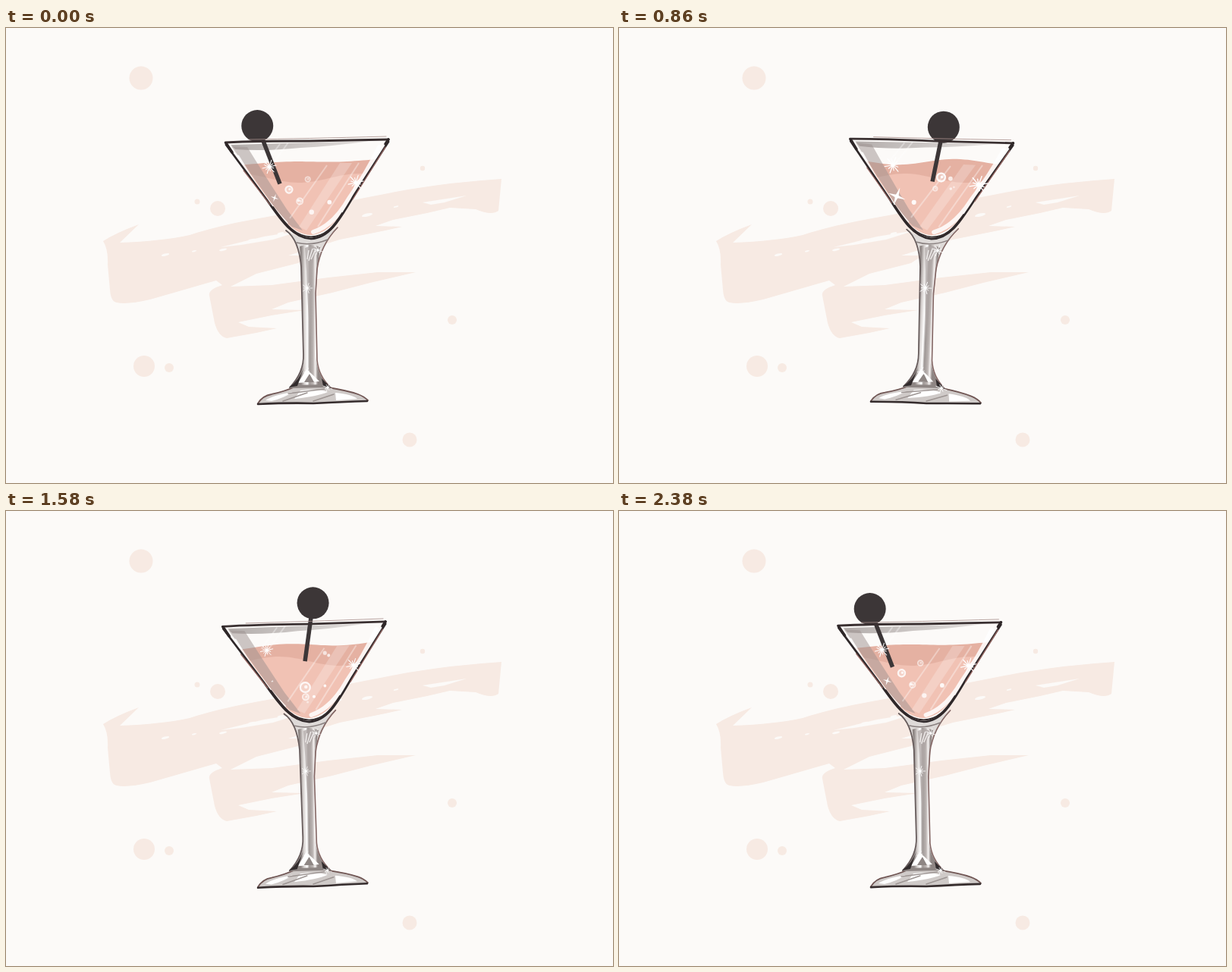
Recreate the animation shown at these times as an HTML page. Size 800 px wide and 600 px high, loop 2400 ms.

```html
<!DOCTYPE html>
<html lang="en">
<head>
<meta charset="utf-8">
<title>Cocktail</title>
<style>
  html, body { margin: 0; width: 100%; height: 100%; overflow: hidden; background: #fcfaf8; }
  svg { display: block; width: 100vw; height: 100vh; }
  .line { fill: none; stroke-linecap: round; stroke-linejoin: round; }
</style>
</head>
<body>
<svg viewBox="0 0 800 600" xmlns="http://www.w3.org/2000/svg">
  <defs>
    <clipPath id="bowl"><path id="bowlShape" d="M290 152 L503 148 L458 219 C439 250 427 270 402 273 C378 272 362 250 344 223 Z"/></clipPath>
    <linearGradient id="band">
      <stop offset="0" stop-color="#b3adab"/><stop offset="1" stop-color="#e4e0de"/>
    </linearGradient>
    <linearGradient id="stem" gradientUnits="userSpaceOnUse" x1="389" x2="411" y1="0" y2="0">
      <stop offset="0" stop-color="#8d8583"/><stop offset=".2" stop-color="#d9d4d2"/><stop offset=".38" stop-color="#fff"/>
      <stop offset=".5" stop-color="#9e9795"/><stop offset=".72" stop-color="#bcb5b3"/><stop offset=".85" stop-color="#f5f2f1"/><stop offset="1" stop-color="#8f8684"/>
    </linearGradient>
  </defs>

  <rect width="800" height="600" fill="#fcfaf8"/>
  <g id="dots" fill="#f7eae3">
    <path d="M653 199 Q590 203 530 213 C470 224 410 237 350 248 C310 255 275 262 242 273 Q205 281 150 283 L175 259 Q145 270 128 281 Q135 292 134 312 L137 345 Q138 361 146 362 Q160 365 190 358 L277 333 L285 339 Q266 345 268 353 L275 389 Q280 407 291 409 L330 402 L357 396 L320 394 L306 388 L350 379 L394 372 L350 371 L372 362 L430 349 L480 336 L540 322 L490 322 L425 329 L350 339 L296 341 L330 324 L385 310 L400 300 L372 300 L440 279 L500 267 L522 262 L487 261 L510 253 L555 244 L585 237 L619 239 Q640 248 649 241 Z"/>
  </g>
  <g id="flecks" fill="#fcfaf8">
    <path d="M283 289 L340 275 L390 267 L352 279 L310 286 Z M549 230 L607 221 L578 230 L560 233 Z"/>
  </g>

  <g class="tilt">
    <!-- foot -->
    <path d="M332 495 Q337 486 350 483 Q370 478 382 472 L420 472 Q450 478 466 484 L477 491 Q405 499 332 495 Z" fill="#cfcac8"/>
    <path d="M342 491 Q352 484 378 480 Q366 488 350 492 Z M388 478 Q410 475 424 480 Q410 486 380 489 Z M434 481 Q456 483 463 489 L435 491 Z" fill="#fff"/>
    <path d="M365 492 L397 481 M405 492 L432 483 M372 482 L420 476" stroke="#9d9593" stroke-width="1.5" class="line"/>
    <path d="M332 495 Q338 485 350 483 Q368 479 381 473 M424 474 Q450 478 464 483 Q472 486 477 491" class="line" stroke="#705654" stroke-width="1.8"/>
    <path d="M332 496 Q375 494 405 495 Q445 493 476 492" class="line" stroke="#352c2d" stroke-width="2.6"/>
    <!-- stem -->
    <path d="M369 266 Q402 290 437 262 Q418 286 413 308 L390 308 Q386 284 369 266 Z" fill="#dedad8"/>
    <path d="M387 288 Q401 283 414 289 Q407 330 408 430 Q409 456 426 473 L374 474 Q392 454 393 435 L390 330 Z" fill="url(#stem)"/>
    <path d="M394 290 Q402 286 411 290 Q404 302 402 325 L401 410 Q397 360 396 320 Z" fill="#b0a9a7" opacity=".75"/>
    <path d="M399 293 L397 305 M404 291 L399 307 M408 292 L402 305" stroke="#f2efee" stroke-width="1.3"/>
    <path d="M396 450 Q403 456 413 466 L385 468 Z" fill="#fff"/>
    <path d="M400 456 L406 467 L393 467 Z M379 471 L420 470 L426 474 L374 475 Z" fill="#8e8684"/>
    <path d="M369 267 Q386 279 389 315 L392 430 Q393 454 374 474" class="line" stroke="#665b5b" stroke-width="1.8"/>
    <path d="M437 263 Q414 287 410 318 L408 350 L410 438 Q412 459 428 474" class="line" stroke="#826563" stroke-width="1.6"/>
    <path d="M392 449 Q387 464 373 474 L384 472 Z M416 462 L429 475 L418 472 Z" fill="#312b2c"/>
    <path d="M383 283 Q402 288 424 279" class="line" stroke="#8a8180" stroke-width="1.5"/>
    <!-- bowl -->
    <path d="M288 151 L505 146 L459 219 C440 252 427 276 402 277 C378 276 362 252 344 226 Z" fill="#fcfaf8"/>
    <path d="M296 154 L480 149 Q430 156 388 158 Q340 163 302 160 Z" fill="url(#band)"/>
  </g>

  <g clip-path="url(#bowl)">
    <path id="back" fill="#e5b1a2"/>
    <path id="front" fill="#f1c2b4"/>
  </g>

  <g class="tilt">
    <path d="M297 156 L318 157 Q342 196 370 239 L391 267 L377 262 Q360 247 344 222 Z" fill="#9d9290" opacity=".5"/>
    <path d="M440 178 L456 178 L396 267 L386 262 Z" fill="#fff" opacity=".22"/>
    <path d="M423 181 L374 251 M465 178 L411 262 M372 151 L345 188 M361 153 L340 181" stroke="#fff" stroke-width="2" opacity=".35"/>
    <path d="M492 157 Q475 192 452 225 Q432 260 405 269" class="line" stroke="#fff" stroke-width="6" opacity=".85"/>
    <path d="M306 169 Q337 222 370 257" class="line" stroke="#fff" stroke-width="3" opacity=".8"/>
  </g>

  <path id="rod" stroke="#3c3637" stroke-width="5.5"/>
  <circle id="knob" r="21" fill="#3c3637"/>

  <g class="tilt">
    <path d="M290 154 L344 227 C362 253 378 277 402 278 C427 277 440 252 459 220 L504 150" class="line" stroke="#2f282a" stroke-width="2.7"/>
    <path d="M352 236 C370 261 382 275 402 275.5 C420 275 430 264 443 244" class="line" stroke="#302829" stroke-width="1.8"/>
    <path d="M313 188 L348 233 M457 226 L500 157" class="line" stroke="#9a6964" stroke-width="1.2"/>
    <path d="M289 151 Q330 149 400 149 Q460 148 504 147" class="line" stroke="#3a3031" stroke-width="2.8"/>
    <path d="M290 152 L298 164 M504 147 L500 153" class="line" stroke="#2e2728" stroke-width="3.6"/>
    <path d="M320 147 Q390 146 501 143" class="line" stroke="#a88e8b" stroke-width=".8"/>
    <g id="bubbles"></g>
    <g id="stars" stroke="#fff" stroke-linecap="round"></g>
  </g>
</svg>
<script>
const LOOP = 2400, TAU = Math.PI * 2;
const $ = id => document.getElementById(id);
const mod = (v, n) => ((v % n) + n) % n;

let seed = 11;
function rand(lo, hi) {
  seed = (seed * 16807) % 2147483647;
  return lo + (hi - lo) * seed / 2147483647;
}

function set(el, attrs) {
  for (const k in attrs) el.setAttribute(k, attrs[k]);
  return el;
}
function add(parent, tag, attrs = {}) {
  const el = document.createElementNS('http://www.w3.org/2000/svg', tag);
  return set(parent.appendChild(el), attrs);
}

// Paint spots, and dry gaps scattered along the brush stroke
[[178, 66, 15.5], [279, 238, 10], [252, 229, 3.5], [549, 185, 3.2], [588, 385, 6], [182, 446, 14], [215, 448, 6], [532, 543, 9.5]]
  .forEach(([cx, cy, r]) => add($('dots'), 'circle', { cx, cy, r }));
for (let i = 0; i < 9; i++) {
  const cx = 210 + i * 38, cy = 306 - i * 8.5 + rand(-7, 5), rx = rand(3, 8);
  add($('flecks'), 'ellipse', { cx, cy, rx, ry: rx / 3.5, transform: `rotate(-13 ${cx} ${cy})` });
}

// Bubbles rise and shrink the spread of the bowl as they start deeper
const bubbles = Array.from({ length: 16 }, (_, i) => {
  const ring = i % 3 === 0;
  const r = ring ? rand(5, 8) : rand(2, 3.8);
  const y = rand(200, 268), spread = Math.min(55, (285 - y) * .65);
  const g = add($('bubbles'), 'g');
  add(g, 'circle', { r, fill: '#fff', 'fill-opacity': ring ? .3 : 1 });
  if (ring) {
    add(g, 'circle', { r: r - 1.2, fill: 'none', stroke: '#fff', 'stroke-width': 2.4 });
    add(g, 'circle', { cx: 1, cy: -.6, r: r * .3, fill: '#fff' });
  }
  return { g, y, x: 400 + rand(-spread, spread), rise: (y - 180) * rand(.3, .9), start: i * LOOP / 16, life: rand(800, 1200) };
});

// x, y, size, rays
const stars = [
  [347, 183, 9.5, 12], [354, 224, 6, 4], [461, 204, 10.5, 12], [397, 343, 7, 10],
  [411, 293, 6.5, 8], [397, 453, 5, 6], [424, 474, 6.5, 8]
].map(([x, y, size, rays]) => {
  const g = add($('stars'), 'g'), cross = rays === 4;
  for (let i = 0; i < rays; i++) {
    const len = i % 2 && !cross ? .65 : 1;
    add(g, 'path', {
      d: cross ? 'M-.2 0L0-1.1L.2 0Z' : `M0 0V${-len}`,
      fill: '#fff', 'stroke-width': cross ? 0 : .11, transform: `rotate(${i * 360 / rays + 18})`
    });
  }
  add(g, 'circle', { r: .23, fill: '#fff', stroke: 'none' });
  return { g, x, y, size, pulse: cross ? .85 : .15 };
});

const tilted = [...document.querySelectorAll('.tilt'), $('bowlShape')];

// The glass leans right a little slower than it returns
function lean(t) {
  const u = mod(t + 500, LOOP);
  return u < 1260 ? -Math.cos(Math.PI * u / 1260) : Math.cos(Math.PI * (u - 1260) / 1140);
}

function surface(height) {
  let d = 'M270 300';
  for (let x = 270; x <= 530; x += 5) d += `L${x} ${height(x)}`;
  return d + 'L530 300Z';
}

function draw(now) {
  const t = mod(now, LOOP), s = lean(t);
  const w = -Math.cos(TAU * (t + 80) / LOOP);
  tilted.forEach(el => set(el, { transform: `rotate(${2 * (s - lean(0))} 404 494)` }));

  // The far surface sways with the glass, the near one follows the stirrer
  set($('back'), { d: surface(x => 176.5 + (3 * s - 2.5) * (x - 400) / 100 - 4 * s * Math.sin(TAU * (x - 405) / 150)) });
  set($('front'), { d: surface(x => 198 + 6 * Math.cos(TAU * (x - 425 - 40 * w) / 160)) });

  const hx = 385 + 55 * w, hy = 122.5 + 8 * w * w + 3.5 * s;
  set($('knob'), { cx: hx, cy: hy });
  set($('rod'), { d: `M${hx} ${hy}L${388 + 26 * w + 5 * s} ${197 + 9 * w * w}` });

  for (const b of bubbles) {
    const p = mod(t - b.start, LOOP) / b.life;
    const k = p < 1 ? Math.sqrt(Math.sin(Math.PI * p)) : 0;
    set(b.g, { transform: `translate(${b.x} ${b.y - b.rise * p}) scale(${k})`, opacity: .92 * k });
  }
  for (const a of stars) {
    const r = a.size * (1 + a.pulse * Math.cos(TAU * 2 * (t - 860) / LOOP));
    set(a.g, { transform: `translate(${a.x} ${a.y}) scale(${r})` });
  }
}

const begin = performance.now();
function tick() {
  draw(performance.now() - begin);
  requestAnimationFrame(tick);
}
tick();
</script>
</body>
</html>
```
